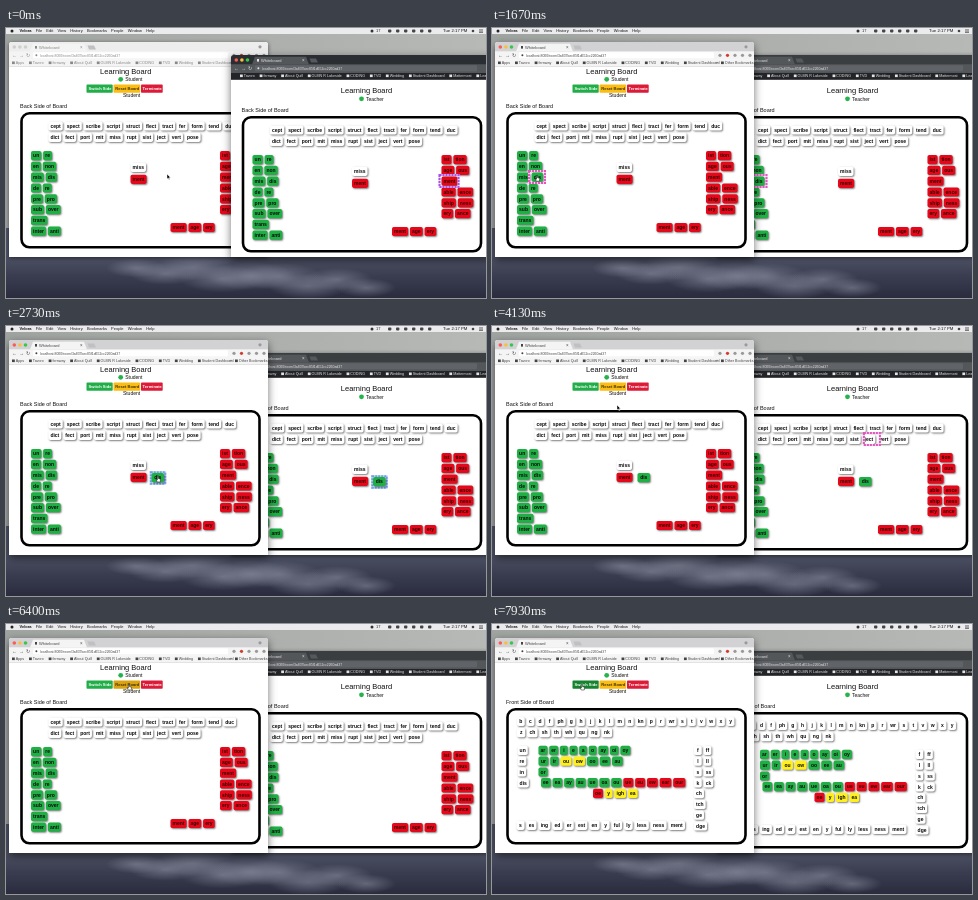
An HTML page with a canvas that plays this animation: 480x270 px, repeating every 8000 ms.

```html
<!DOCTYPE html>
<html lang="en">
<head>
<meta charset="utf-8">
<title>Learning Board</title>
<style>
html, body { margin: 0; width: 480px; height: 270px; overflow: hidden; background: #3c3f50; }
canvas { display: block; width: 480px; height: 270px; }
</style>
</head>
<body>
<canvas id="stage"></canvas>
<script>
const LOOP = 8000;
const canvas = document.getElementById('stage');
const ctx = canvas.getContext('2d');
const ratio = window.devicePixelRatio || 1;
canvas.width = 480 * ratio;
canvas.height = 270 * ratio;

const SANS = '"Liberation Sans", Arial, sans-serif';
const GREEN = '#20af45', RED = '#e4081a', YELLOW = '#fff01c', WHITE = '#fff';

// moments of the story, in ms
const T = {
  unmark: 400, raise: 950, hover: 1050, drag: 1800, drop: 2600, settle: 3250,
  ject: 4000, jectEnd: 4480, reset: 4950, clear: 5660, leave: 6680,
  linkEnd: 7470, switchOn: 7550, flip: 7720
};

// pointer stops: time, x, y
const STOPS = [
  [70, 162, 148], [870, 48, 152], [T.drag, 45, 149], [T.drop, 152, 152],
  [3900, 152, 150], [4130, 126, 81], [4670, 125, 79], [5100, 123, 63],
  [6600, 123, 62], [6850, 143, 61], [7130, 136, 72], [7600, 90, 62]
];

const ease = k => k * k * (3 - 2 * k);
const between = (t, a, b) => t >= a && t < b;

function pointer(t) {
  const next = STOPS.findIndex(s => s[0] > t);
  if (next < 1) return STOPS.at(next).slice(1);
  const [t0, x0, y0] = STOPS[next - 1], [t1, x1, y1] = STOPS[next];
  const k = ease((t - t0) / (t1 - t0));
  return [x0 + (x1 - x0) * k, y0 + (y1 - y0) * k];
}

function rect(x, y, w, h, fill) {
  ctx.fillStyle = fill;
  ctx.fillRect(x, y, w, h);
}

function round(x, y, w, h, r, fill) {
  ctx.beginPath();
  ctx.roundRect(x, y, w, h, r);
  ctx.fillStyle = fill;
  ctx.fill();
}

function dot(x, y, r, fill) {
  ctx.beginPath();
  ctx.arc(x, y, r, 0, 7);
  ctx.fillStyle = fill;
  ctx.fill();
}

function shape(d, fill) {
  const path = new Path2D(d);
  ctx.fillStyle = fill;
  ctx.fill(path);
  return path;
}

function width(s, size, weight = 400) {
  ctx.font = `${weight} ${size}px ${SANS}`;
  return ctx.measureText(s).width;
}

// returns the x where the text ends
function text(s, x, y, size, fill = '#111', align = 'left', weight = 400) {
  const w = width(s, size, weight);
  ctx.textAlign = align;
  ctx.fillStyle = fill;
  ctx.fillText(s, x, y + size * 0.34);
  return x + w;
}

function shadow(color, blur, dx, dy) {
  ctx.shadowColor = color;
  ctx.shadowBlur = blur * ratio;
  ctx.shadowOffsetX = dx * ratio;
  ctx.shadowOffsetY = dy * ratio;
}
const noShadow = () => shadow('transparent', 0, 0, 0);

function gradient(x0, y0, x1, y1, ...colors) {
  const g = ctx.createLinearGradient(x0, y0, x1, y1);
  colors.forEach((c, i) => g.addColorStop(i / (colors.length - 1), c));
  return g;
}

function puff(x, y, r, alpha) {
  ctx.save();
  ctx.translate(x, y);
  ctx.scale(1, 0.32);
  const g = ctx.createRadialGradient(0, 0, 0, 0, 0, r);
  g.addColorStop(0, `rgba(150,155,172,${alpha})`);
  g.addColorStop(1, 'rgba(150,155,172,0)');
  dot(0, 0, r, g);
  ctx.restore();
}

// misty valley: a band of puffs sinking to the right
function wallpaper() {
  rect(0, 0, 480, 200, gradient(0, 0, 480, 0, '#a0a4a1', '#abaeab', '#b7b9b6'));
  rect(0, 200, 480, 70, gradient(0, 226, 0, 270, '#505467', '#3a3d50', '#2a2c3e'));
  for (let i = 0; i < 9; i++) {
    const k = i / 8;
    puff(130 + 230 * k, 240 + 18 * k + 5 * Math.sin(i * 2.4), 30 + 14 * Math.sin(Math.PI * k), 0.5);
  }
}

function menuBar() {
  rect(0, 0, 480, 6, '#ebebee');
  dot(6, 3, 1.5, '#222');
  let x = text('Velora', 13.5, 3, 4, '#111', 'left', 700);
  for (const s of 'File Edit View History Bookmarks People Window Help'.split(' '))
    x = text(s, x + 4.2, 3, 4);
  dot(366, 3, 1.5, '#333');
  text('17', 370, 3, 4, '#222');
  for (let i = 0; i < 6; i++) round(382 + i * 8, 1.6, 3.4, 2.8, 0.8, '#444');
  text('Tue 2:17 PM', 437, 3, 4.3);
  dot(467, 3, 1.3, '#444');
  for (let i = 0; i < 3; i++) rect(473, 1.6 + i * 1.2, 4, 0.6, '#333');
}

const MARKS = ['Tavoro', 'fernway', 'About Quill', 'OLMN R Lakeside', 'CODING', 'TVD', 'Wedding', 'Student Dashboard'];

function bookmarks(x, names, ink) {
  for (const name of names) {
    rect(x, 19.5, 2.8, 2.6, ink);
    x = text(name, x + 3.8, 20.8, 3.7, ink) + 4.8;
  }
}

function browser(x, y, w, active, dark) {
  const ink = dark ? '#e4e4e4' : active ? '#444' : '#888';
  const bar = dark ? (active ? '#2a2d31' : '#3b3e41') : active ? '#d2d2d4' : '#ededee';
  const tool = dark ? '#54575a' : '#f4f4f4';
  shadow('rgba(0,0,0,.55)', active ? 9 : 4, 0, active ? 3 : 1);
  round(x, y, w, 229 - y, [2.5, 2.5, 0, 0], WHITE);
  noShadow();
  ctx.save();
  ctx.translate(x, y);
  round(0, 0, w, 10, [2.5, 2.5, 0, 0], bar);
  rect(0, 9.3, w, 8, tool);
  rect(0, 17.3, w, 7.4, dark ? '#222427' : tool);
  const lights = active ? ['#fc5b56', '#fdbd3c', '#35c84a'] : Array(3).fill(dark ? '#666' : '#cfcfcf');
  lights.forEach((c, i) => dot(5.3 + i * 5.6, 5, 1.8, c));
  shape('M21 9.5L24 1.8H75L78 9.5z', tool);
  shape('M80 7.5L78.5 3.5H85L87 7.5z', dark ? '#55585c' : '#c0c0c2');
  rect(26, 4, 2, 2.6, ink);
  text('Whiteboard', 30, 5.4, 4, ink);
  text('×', 71, 5.4, 4.5, ink);
  ['←', '→', '↻'].forEach((s, i) => text(s, 3 + i * 7, 13.2, 5, ink));
  round(24, 10.3, dark ? 222 : 195, 6, 1, dark ? '#606367' : WHITE);
  dot(27.4, 13.3, 1, ink);
  text('localhost:8000/room/3a837bec85f1d652cc2260ad37', 31, 13.4, 3.45, ink);
  if (dark) {
    bookmarks(9, [...MARKS, 'Mattermost', 'Learning Algorithms'], ink);
  } else {
    for (let i = 0; i < 5; i++) dot(225 + i * 7.5, 13.3, 1.6, i === 1 ? '#d33a30' : '#999');
    dot(251, 4.8, 1.6, '#999');
    bookmarks(3, ['Apps', ...MARKS], ink);
    text('»', 221, 20.8, 4, ink);
    bookmarks(226, ['Other Bookmarks'], ink);
  }
  rect(0, 24.4, w, 0.5, dark ? '#333' : '#cfcfcf');
  ctx.restore();
}

function tile(word, x, y, fill, w) {
  shadow('rgba(0,0,0,.5)', 1.8, 0.9, 1);
  round(x, y - 4.6, w, 9.2, 1.8, fill);
  noShadow();
  text(word, x + w / 2, y, 5, fill === RED ? '#3c0004' : '#0c0c0c', 'center', 700);
}

// gap: spacing plus padding around a word; returns the x of the next tile
function row(x, y, words, fill = WHITE, gap = 6) {
  for (const word of words.split(' ')) {
    const w = Math.max(3.6, width(word, 5, 700)) + gap;
    tile(word, x, y, fill, w - 1.85);
    x += w;
  }
  return x;
}

const column = (x, y, rows, fill) =>
  rows.split('/').forEach((words, i) => row(x, y + i * 10.8, words, fill));

function ring(x, y, w, h, color, back, dash = [2, 1]) {
  ctx.lineWidth = 2;
  for (const [c, d] of [[back, []], [color, dash]]) {
    ctx.strokeStyle = c;
    ctx.setLineDash(d);
    ctx.strokeRect(x - w / 2, y - h / 2, w, h);
  }
}
const pinkRing = (x, y) => ring(x, y, 16, 12, '#e058bc', '#f6cdee');

function backSide(t, teacher) {
  row(42.3, 98, 'cept spect scribe script struct flect tract fer form tend duc');
  row(42.3, 109.3, 'dict fect port mit miss rupt sist ject vert pose');
  column(25, 127.6, 'un re/en non/mis dis/de re/pre pro/sub over/trans/inter anti', GREEN);
  column(214, 127.6, 'ist tion/age ous/ment/able ence/ship ness/ery ance', RED);
  row(164.5, 199.5, 'ment age ery', RED);
  if (t < T.clear) {
    row(124.5, 139.3, 'miss');
    row(124.5, 151.3, 'ment', RED);
  }
  if (teacher && t < T.unmark) ring(221.5, 149, 19, 12, '#a455e8', '#e3cdf8');
  if (between(t, T.hover, T.drag)) pinkRing(45, 149);
  if (between(t, T.drag, T.clear)) {
    const [x, y] = pointer(Math.min(t, T.drop));
    if (t < T.settle) ring(x, y, 14.5, 11.5, '#6f9fe6', '#c7dbf8');
    tile('dis', x - 6.5, y - 0.4, GREEN, 12.5);
  }
  if (teacher && between(t, T.ject, T.jectEnd)) pinkRing(158.4, 109);
}

function frontSide() {
  row(25, 97.5, 'b c d f ph g h j k l m n kn p r wr s t v w x y');
  row(25, 108.6, 'z ch sh th wh qu ng nk', WHITE, 6.5);
  column(25.5, 126.4, 'un/re/in/dis', WHITE);
  column(202, 126.4, 'f ff/l ll/s ss/k ck/ch/tch/ge/dge', WHITE);
  row(46.5, 126.4, 'ar er i e a o ay oi oy', GREEN);
  let x = row(46.5, 137.2, 'ur ir', GREEN, 6.7);
  x = row(x, 137.2, 'ou ow', YELLOW, 6.7);
  row(x, 137.2, 'oo ee au', GREEN, 6.7);
  row(46.5, 148, 'or', GREEN);
  x = row(49, 158.6, 'ee ea ay au ue oa ou', GREEN);
  row(x, 158.6, 'ue eu ew ear our', RED);
  x = row(101, 169.4, 'oe', RED);
  row(x, 169.4, 'y igh ea', YELLOW);
  row(24.4, 201.3, 's es ing ed er est en y ful ly less ness ment', WHITE, 6.4);
}

function board(t, teacher) {
  const front = t >= T.flip;
  ctx.save();
  if (teacher) ctx.translate(221.5, 4);
  text((front ? 'Front' : 'Back') + ' Side of Board', 14, 78.3, 5.5);
  ctx.beginPath();
  ctx.roundRect(15.5, 85.3, 238, 134, 8);
  ctx.lineWidth = 2.6;
  ctx.strokeStyle = '#000';
  ctx.stroke();
  if (front) frontSide();
  else backSide(t, teacher);
  ctx.restore();
}

function heading(role, x, y) {
  text('Learning Board', x, y, 7.5, '#111', 'center');
  dot(x - 5, y + 8, 2.4, '#25b34b');
  text(role, x - 0.5, y + 8, 5);
}

function button(label, x, w, fill, ink = WHITE) {
  round(x, 56.6, w - 0.8, 8.2, 0.8, fill);
  text(label, x + w / 2, 60.6, 4.1, ink, 'center', 700);
}

function studentWindow(t) {
  browser(3, 14, 259, t >= T.raise, false);
  heading('Student', 119.7, 43.3);
  const pressed = Math.abs(t - T.clear) < 90 || between(t, 6330, 6400);
  const over = between(t, T.reset, T.leave);
  button('Switch Side', 80.5, 27, t >= T.switchOn ? '#16842f' : '#21ad48');
  button('Reset Board', 107.5, 27.5, pressed ? '#c28b08' : over ? '#dba30f' : '#fbbc14', '#3d3210');
  button('Terminate', 135, 22.5, between(t, T.leave, 7000) ? '#bd1a31' : '#dc1b38');
  text('Student', 125.5, 67.6, 5, '#111', 'center');
  board(t, false);
  if (between(t, T.leave, T.linkEnd)) {
    round(3, 223.8, 86, 5.2, [0, 1.5, 0, 0], '#dedede');
    text('localhost:8000/users/dashboard', 5, 226.4, 3.7, '#555');
  }
}

function teacherWindow(t) {
  browser(225, 27, 262, t < T.raise, true);
  heading('Teacher', 360.5, 62.8);
  board(t, true);
}

function cursor(t) {
  const hand = between(t, T.hover, T.ject) || between(t, T.reset, 6950) || t >= T.switchOn;
  ctx.save();
  ctx.translate(...pointer(t));
  const path = hand
    ? shape('M-.6-1.6H.4L.5.6 2.6 1.2 2.3 4H-.8L-2 1.6-.6 2z', WHITE)
    : shape('M-1-2V3L.2 2 1 3.7 1.8 3.3 1 1.7H2.6z', '#000');
  ctx.lineWidth = 0.5;
  ctx.strokeStyle = hand ? '#111' : WHITE;
  ctx.stroke(path);
  ctx.restore();
}

function draw(t) {
  ctx.setTransform(ratio, 0, 0, ratio, 0, 0);
  wallpaper();
  const layers = [studentWindow, teacherWindow];
  if (t >= T.raise) layers.reverse();
  layers.forEach(layer => layer(t));
  menuBar();
  cursor(t);
}

const start = performance.now();
function tick() {
  draw((performance.now() - start) % LOOP);
  requestAnimationFrame(tick);
}
tick();
</script>
</body>
</html>
```
